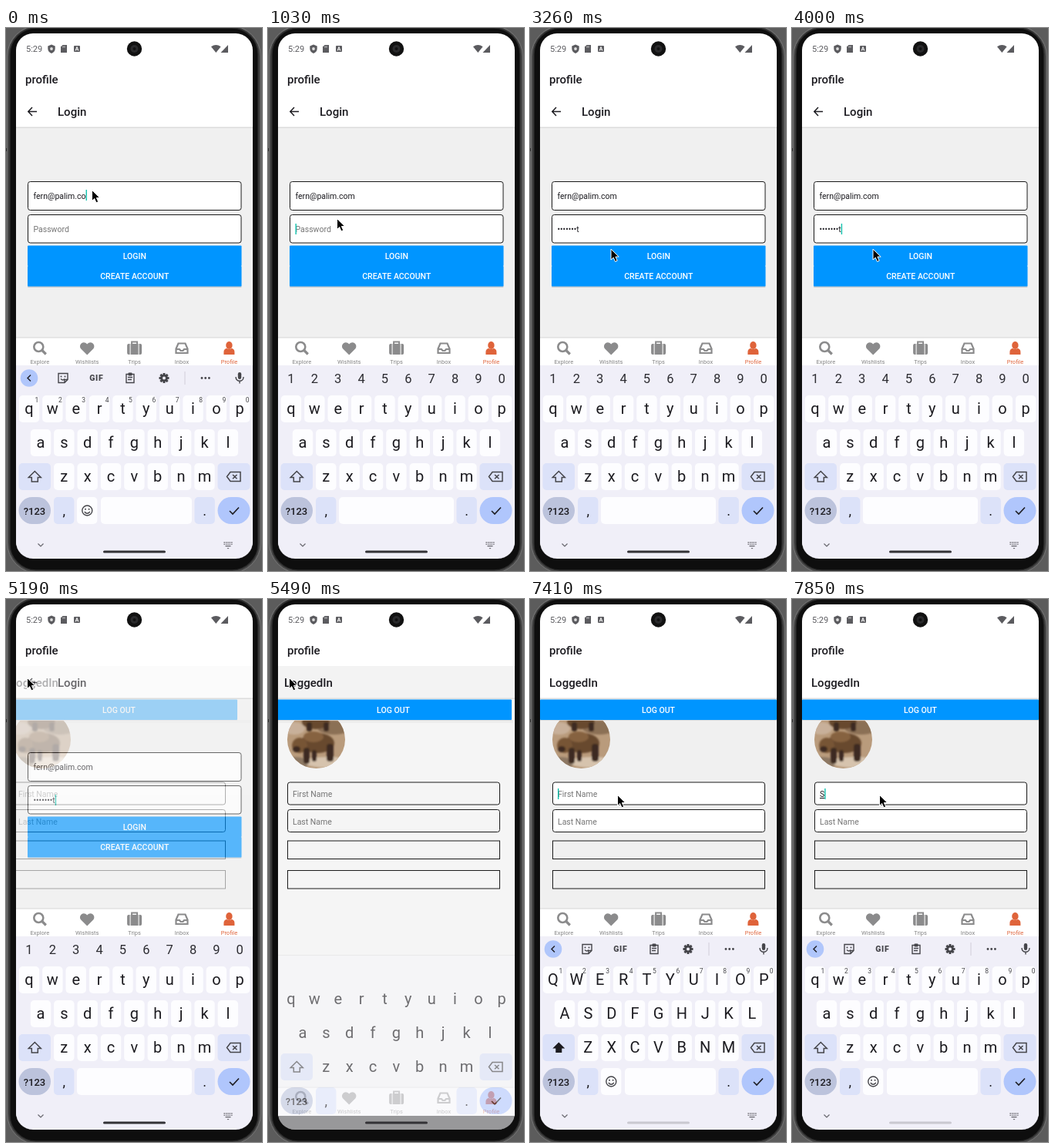
Recreate the animation shown at these times as an HTML page. Size 332 by 705 pixels, loop 8 s.

```html
<!DOCTYPE html>
<html lang="en">
<head>
<meta charset="utf-8">
<title>Login flow</title>
<style>
html, body { margin: 0; width: 100%; height: 100%; overflow: hidden; background: #555; }
svg { display: block; width: 332px; height: 705px; font-family: Roboto, Inter, sans-serif; }
</style>
</head>
<body>
<svg id="stage" viewBox="0 0 332 705"></svg>
<script>
const LOOP = 8000, STEPS = 54;
const stage = document.getElementById('stage');
const pen = document.createElement('canvas').getContext('2d');
const EMAIL = 'fern@palim.com', PASSWORD = 'testtest';
const INK = '#1c1b20', GRAY = '#8b8b8c', ICON = '#45454a', BLUE = '#0095ff', ACCENT = '#df633a';

// Markup helpers
const at = (x, y, body) => `<g transform="translate(${x} ${y})">${body}</g>`;
const rect = (x, y, w, h, fill, rx = 0, attrs = '') =>
  `<rect x="${x}" y="${y}" width="${w}" height="${h}" rx="${rx}" fill="${fill}" ${attrs}/>`;
const disc = (x, y, r, fill, attrs = '') => `<circle cx="${x}" cy="${y}" r="${r}" fill="${fill}" ${attrs}/>`;
const oval = (x, y, rx, ry, fill) => `<ellipse cx="${x}" cy="${y}" rx="${rx}" ry="${ry}" fill="${fill}"/>`;
const text = (x, y, size, str, fill = INK, attrs = '') =>
  `<text x="${x}" y="${y}" font-size="${size}" fill="${fill}" ${attrs}>${str}</text>`;
const mid = (x, y, size, str, fill, attrs = '') => text(x, y, size, str, fill, 'text-anchor="middle" ' + attrs);
const line = (d, color = ICON, width = 1.4) =>
  `<path d="${d}" fill="none" stroke="${color}" stroke-width="${width}"/>`;
const shape = (d, fill) => `<path d="${d}" fill="${fill}"/>`;
const title = (x, y, str) => text(x, y, 15, str, INK, 'font-weight="500"');
const range = (k, from, to) => k >= from && k < to;

// Value of a track [[step, ...values], ...] at step k, linear between points
function track(points, k) {
  const i = points.findIndex(p => p[0] > k);
  if (i < 0) return points[points.length - 1].slice(1);
  if (i === 0) return points[0].slice(1);
  const a = points[i - 1], b = points[i], u = (k - a[0]) / (b[0] - a[0]);
  return a.slice(1).map((v, j) => v + (b[j + 1] - v) * u);
}

const POINTER = [[0, 111, 210], [2, 111, 210], [5, 89, 247], [18, 89, 247], [22, 104.5, 286.5], [28, 104.5, 286.5],
  [31, 8, 108], [33, 27, 102], [37, 27, 102], [42, 127, 288], [44, 130, 297], [47, 113, 254]];
const PAGE = [[34, -30, 0], [35, -20, .35], [36, -10, .8], [37, -4, 1], [38, 0, 1]];
const KEYBOARD = [[35, 0, 1], [36, 8, .85], [37, 25, .62], [38, 45, .15], [39, 60, 0],
  [47, 120, 0], [48, 80, .5], [49, 20, .9], [50, 0, 1]];
const TYPED = [[10, 2], [12, 3], [14, 4], [16, 6], [17, 7], [19, 8]];

function caret(x, y, str) {
  pen.font = '10.5px Roboto, Inter, sans-serif';
  return rect(x + pen.measureText(str).width, y, 1.4, 14, '#12c2ae');
}

function button(x, y, w, label, fill = BLUE) {
  return rect(x, y, w, 26.5, fill, 1) + mid(x + w / 2, y + 17.3, 10.5, label, '#fff', 'font-weight="500"');
}

const field = (x, y, w, h, rx, fill) => rect(x, y, w, h, fill, rx, 'stroke="#1a1a1a"');

function statusBar() {
  const c = '#5b5b5f';
  return text(26, 31, 11, '5:29', c)
    + at(59, 27, shape('M0-5.5L4.7-3.6V0C4.7 3 2.5 5 0 6C-2.5 5-4.7 3-4.7 0V-3.6Z', c) + disc(0, 0, 1.9, '#ddd'))
    + at(75, 27, shape('M-1.5-5H4V5H-4V-2.5Z', c) + line('M-1-3.5V-1.5M1-3.5V-1.5', '#ddd', 1))
    + at(92, 27, rect(-4, -4, 8, 8, c, 1) + line('M-2 2.5L0-2.5L2 2.5M-1 1H1', '#fff', 1))
    + shape('M266 24.3Q272.3 19.5 278.6 24.3L272.3 32Z', c) + shape('M288 22V32H278.5Z', c)
    + disc(166.5, 27, 9.7, '#111') + disc(166.5, 27, 5, '#29292b') + disc(166.5, 27, 2, '#111');
}

function loginPage(k) {
  const count = k < 10 ? 0 : TYPED.filter(p => p[0] <= k).pop()[1];
  const secret = count ? '•'.repeat(count - 1) + PASSWORD[count - 1] : '';
  const email = k < 1 ? EMAIL.slice(0, -1) : EMAIL;
  const pressed = range(k, 28, 31);
  const lit = k < 19 ? k !== 8 && k !== 9 : Math.floor((k - 18.5) / 3.4) % 2 === 0;
  let out = rect(13, 129, 307, 273, '#f0f0f0') + rect(13, 128.5, 307, 1.5, '#dcdcdc')
    + line('M40 108.5H29M34 103L28.8 108.5L34 114', INK, 1.5) + title(67, 114, 'Login')
    + field(28.5, 199.5, 276.5, 37, 3, '#fff') + field(28.5, 242.5, 276.5, 36.5, 3, '#fff')
    + text(35.5, 221.5, 10.5, email)
    + (secret ? text(35.5, 265, 10.5, secret) : text(35.5, 265, 10.5, 'Password', '#757575'));
  if (lit) out += k < 5 ? caret(35.5, 210, email) : caret(35.5, 254, secret);
  return out + rect(28, 334, 277.5, 3, '#c9cdd1', 1)
    + button(28, 282.5, 277.5, 'LOGIN', pressed ? '#2ba6ff' : BLUE)
    + button(28, 309, 277.5, 'CREATE ACCOUNT')
    + (pressed ? rect(28, 309, 277.5, 2, '#0079d0') : '');
}

// A soft impression of a brown bear on pale ground
function avatar() {
  const fur = '#67482f', dark = '#3d2c20';
  return '<g clip-path="url(#round)">' + rect(28, 144, 78, 78, '#b99b7c') + '<g filter="url(#soft)">'
    + oval(90, 167, 22, 9, '#8b6f55') + oval(38, 168, 14, 8, '#c8b09a')
    + oval(36, 213, 22, 8, '#8d7864') + oval(82, 212, 30, 7, '#d6c3ad')
    + oval(66, 160, 18, 9, fur) + rect(54, 160, 7, 12, dark, 3) + rect(76, 160, 7, 12, dark, 3)
    + oval(68, 187, 22, 13, fur) + oval(63, 179, 13, 7, '#86623f') + oval(45, 190, 10, 10, '#775436')
    + oval(41, 195, 5, 4, dark) + rect(50, 193, 8, 21, dark, 4) + rect(61, 196, 6, 15, dark, 3)
    + rect(80, 188, 9, 23, dark, 4) + '</g></g>';
}

function profilePage(k) {
  const [dx, alpha] = track(PAGE, k);
  const moving = k < 38;
  const head = moving ? '#f3f3f3' : '#fff', body = moving ? '#f5f5f5' : '#f0f0f0', box = moving ? body : '#fff';
  const named = k >= 53;
  return `<g opacity="${alpha}">` + rect(13, 87, 307, 42, head) + rect(13, 129, 307, 542, body)
    + rect(13, 128.5, 307, 1.5, '#dedede') + (moving ? rect(13, 157, 305, 4, '#ededed') : '')
    + at(dx, 0, title(25, 114, 'LoggedIn') + avatar()
      + rect(13, 156, 307, 1.8, '#d5d8da') + button(13, 130.5, 307, 'LOG OUT')
      + field(29.5, 238, 275, 29, 3, box) + field(29.5, 273.5, 275, 29, 3, box)
      + field(29.5, 314, 275, 23.5, 0, body) + field(29.5, 352.5, 275, 23.5, 0, body)
      + (named ? text(36, 257, 10.5, 'S', INK, 'text-decoration="underline"')
        : text(36, 257, 10.5, 'First Name', '#757575'))
      + text(36, 292.5, 10.5, 'Last Name', '#757575')
      + (k >= 48 ? caret(36, 246, named ? 'S' : '') : ''))
    + '</g>';
}

function tabBar(top) {
  const icons = [
    disc(-1.5, -1.5, 6, 'none', `stroke="${GRAY}" stroke-width="2.6"`) + line('M3 3L8 8', GRAY, 3.2),
    shape('M0 9L-8 1C-12-4-5-11 0-5C5-11 12-4 8 1Z', GRAY),
    rect(-9.5, -5.5, 19, 14, GRAY, 2) + line('M-3.5-5V-8H3.5V-5', GRAY, 2) + line('M-5.5-6V9M5.5-6V9', '#fff', 1),
    line('M-7.5 1L-4.5-6H4.5L7.5 1V6.5H-7.5ZM-7.5 1.5H-3L-1.5 3.5H1.5L3 1.5H7.5', GRAY, 2.2),
    oval(0, -3.5, 4.2, 5, ACCENT) + shape('M-7 8.5V5C-7 2-5 .5-3 .5Q0 2.5 3 .5C5 .5 7 2 7 5V8.5Z', ACCENT)
  ];
  return at(0, top, rect(13, 0, 307, 37, '#fff') + rect(13, -.5, 307, 1, '#d8d8d8')
    + ['Explore', 'Wishlists', 'Trips', 'Inbox', 'Profile'].map((name, i) => {
      const x = 43.8 + 61.4 * i;
      return at(x, 13.5, icons[i]) + mid(x, 34.2, 7.5, name, i === 4 ? ACCENT : '#858586');
    }).join(''));
}

function toolbar() {
  const tooth = i => `<rect x="-1.5" y="-6.5" width="3" height="4" fill="${ICON}" transform="rotate(${45 * i})"/>`;
  const teeth = Array.from({ length: 8 }, (_, i) => tooth(i)).join('');
  return disc(30, 454.5, 11.3, '#b0c6fb') + line('M32 450.5L28 454.5L32 458.5', INK)
    + at(74, 454.5, line('M-6-6H6V2L2 6H-6ZM2 6V2H6M-3 1Q0 4 2 1') + disc(-2.5, -2, 1, ICON) + disc(2.5, -2, 1, ICON))
    + mid(117.3, 458, 10.5, 'GIF', ICON, 'font-weight="900" letter-spacing=".6"')
    + at(161, 454.5, line('M-5-5H5V6H-5ZM-3-1H3M-3 2H2') + rect(-2.5, -7, 5, 4, ICON, 1))
    + at(205, 454.5, teeth + disc(0, 0, 4.8, ICON) + disc(0, 0, 2, '#f0eff8'))
    + rect(231.5, 446, 1, 17, '#cfced8')
    + [254, 258.7, 263.4].map(x => disc(x, 454.5, 1.4, ICON)).join('')
    + at(303, 454, rect(-2.2, -7, 4.4, 9, ICON, 2.2) + line('M-5-1C-5 6 5 6 5-1M0 4.5V7.5'));
}

function keyboard(k) {
  const [dy, alpha] = track(KEYBOARD, k);
  if (!alpha) return '';
  const digits = range(k, 6, 40), leaving = range(k, 37, 40), caps = range(k, 47, 53);
  const white = leaving ? 'none' : '#fdfdff', tint = '#dce2f9';
  const key = (x, y, w, fill, rx = 5) => rect(x, y, w, 35, fill, rx);
  const row = (letters, x, y) => [...letters].map((c, i) => {
    const cx = x + 30.36 * i;
    return key(cx - 13.2, y, 26.4, white) + mid(cx, y + 24.3, 20, caps ? c.toUpperCase() : c, INK);
  }).join('');
  const numbers = [...'1234567890'].map((n, i) => digits
    ? mid(30 + 30.36 * i, 461.3, 16.5, n, '#2c2c31')
    : mid(40 + 30.36 * i, 486, 8.5, n, ICON)).join('');
  const arrow = 'M0-7L8 1H4V6.5H-4V1H-8Z';
  const smiley = disc(0, 0, 6.5, 'none', `stroke="${ICON}" stroke-width="1.4"`)
    + disc(-2.3, -1.7, 1, ICON) + disc(2.3, -1.7, 1, ICON) + line('M-3.5 1.5Q0 6 3.5 1.5');
  const footer = line('M41.5 669.5L45 673L48.5 669.5', '#66656c', 1.2)
    + line('M282.5 668H293.5M282.5 670.3H293.5', '#66656c', 1.3).replace('/>', ' stroke-dasharray="1.4 1"/>')
    + line('M284.5 672.7H291.5', '#66656c', 1.2) + shape('M286.5 675H289.5L288 676.5Z', '#66656c');
  return `<g opacity="${alpha}">` + at(0, dy,
    rect(13, 438, 307, 260, leaving ? '#f6f6f9' : '#f0eff8') + (leaving ? rect(13, 437, 307, 1, '#e2e2e2') : '')
    + (digits ? '' : toolbar())
    + row('qwertyuiop', 30, 477) + row('asdfghjkl', 45, 521) + row('zxcvbnm', 75.3, 565)
    + (leaving ? '' : numbers)
    + key(16.5, 565, 41.5, tint) + at(37.3, 582.5, caps ? shape(arrow, INK) : line(arrow, ICON, 1.5))
    + key(274.5, 565, 42, tint)
    + at(295.5, 582.5, line('M-9 0L-4.5-6H8.5V6H-4.5ZM-1.5-2.5L4 2.8M4-2.5L-1.5 2.8', ICON, 1.5))
    + key(16.5, 609, 41.5, '#bcc3dc', 17.5) + mid(37, 631.5, 13, '?123', INK, 'font-weight="500"')
    + key(62, 609, 26.4, tint) + mid(75.3, 633, 18, ',', INK)
    + (digits ? key(92, 609, 149, white)
      : key(92, 609, 26.4, white) + key(123, 609, 118, white) + at(105.3, 626.5, smiley))
    + key(244.5, 609, 26.4, tint) + mid(257.7, 633, 18, '.', INK)
    + key(274.5, 609, 42, '#b0c6fc', 17.5) + line('M290 627L294 631L302 622.5', INK, 1.6)
    + (leaving ? '' : footer))
    + '</g>';
}

function bezel() {
  return rect(0, 0, 332, 705, '#5c5c5c') + rect(0, 156, 2, 4, '#222')
    + rect(1.5, -3, 329, 711, '#484848', 40, 'stroke="#777"')
    + rect(5, 0, 322, 704, '#0e0e0e', 34, 'stroke="#2c2c2c" stroke-width="1.5"');
}

function scene(k) {
  const up = k < 36 || k >= 48;
  const [px, py] = track(POINTER, k);
  const bar = k < 38 ? '#333236' : k < 48 ? '#eee' : '#c9c8d0';
  return `<defs><clipPath id="screen">${rect(13, 7, 307, 682, '#000', 22)}</clipPath>`
    + `<clipPath id="round">${disc(66.5, 182.5, 37.5, '#000')}</clipPath>`
    + '<filter id="soft"><feGaussianBlur stdDeviation="1.3"/></filter></defs>'
    + bezel()
    + '<g clip-path="url(#screen)">' + rect(13, 7, 307, 682, '#fff')
    + statusBar() + title(25, 72.3, 'profile')
    + (k < 37 ? loginPage(k) : '') + (k >= 35 ? profilePage(k) : '')
    + rect(13, 671, 307, 18, '#000') + tabBar(up ? 402 : 634) + keyboard(k)
    + rect(126, 678.5, 81, 3, bar, 1.5) + '</g>'
    + at(px, py, '<path d="M.5 .5V14.5L3.7 11.5L6 16.8L8.7 15.6L6.4 10.5H10.7Z" fill="#000" stroke="#fff"/>');
}

let shown = -1;
function frame(now) {
  const k = Math.floor((now % LOOP) / LOOP * STEPS + .03) % STEPS;
  if (k !== shown) stage.innerHTML = scene(shown = k);
  requestAnimationFrame(frame);
}
frame(0);
</script>
</body>
</html>
```
